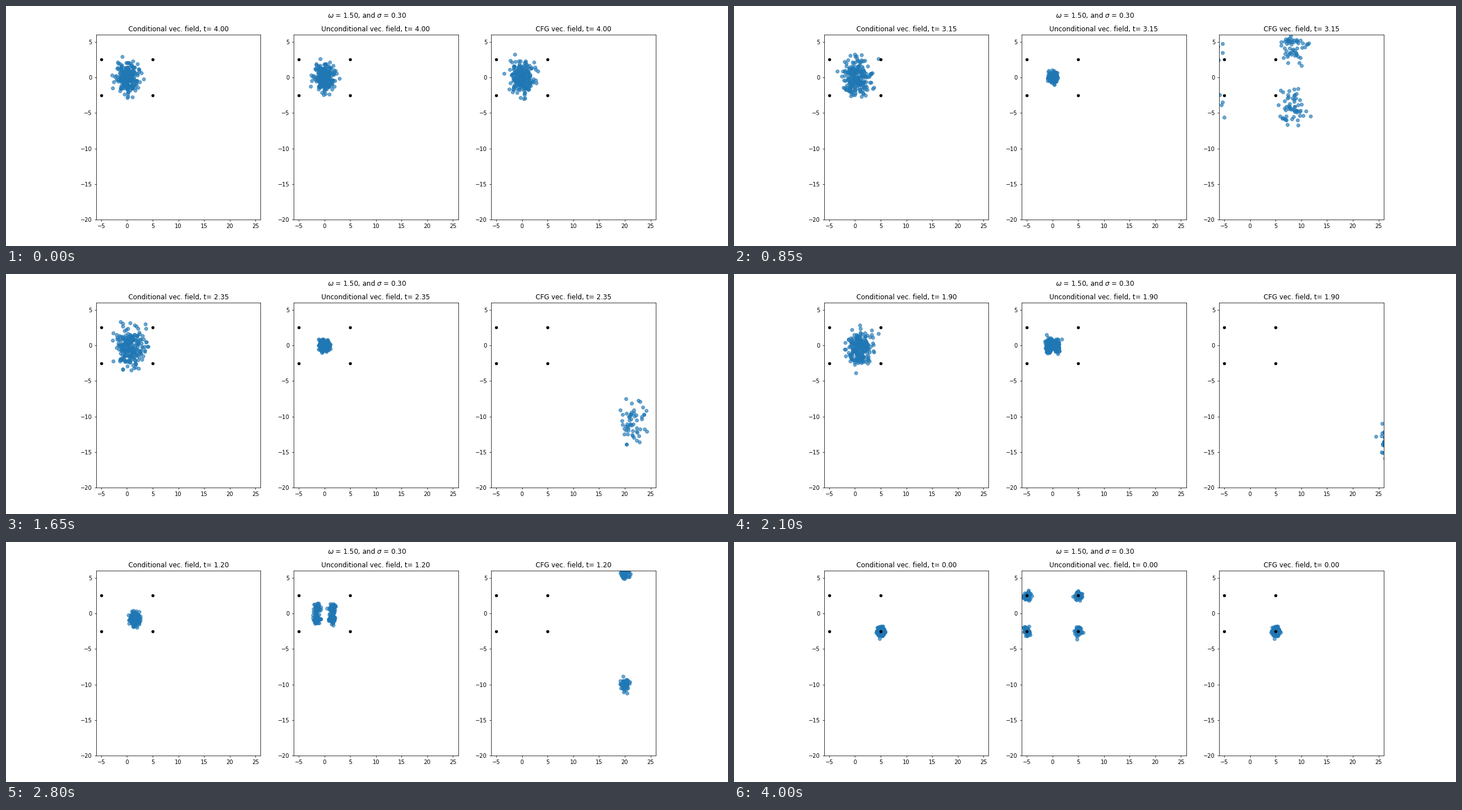
A matplotlib script that plays this animation: 1280 by 427 pixels, repeating every 4.05 s.

```python
import numpy as np
import matplotlib.pyplot as plt
from matplotlib.animation import FuncAnimation

W, H = 1280, 427
DPI = W / 18
FRAMES, DT, T0 = 81, 0.05, 4.0
N = 224
KICK = 0.28                        # noise added at every step
TARGET = np.array([5.0, -2.5])
MODES = [(x, y) for x in (-5, 5) for y in (-2.5, 2.5)]
NAMES = ["Conditional", "Unconditional", "CFG"]

times = np.round(T0 - DT * np.arange(FRAMES), 2)
elapsed = T0 - times

# Deviation of the clouds: wide until t = 1.65, then narrow; or settling fast.
spread_c = (0.32 + 1.3 / (1 + np.exp(-4 * (times - 1.65)))
            - 0.5 * np.exp(-elapsed))
spread_u = 0.33 + 0.67 * np.exp(-4 * elapsed)

# The guided cloud is split in four, thrown outward and pulled back.
centre = (1 + 0.9 * times) * np.exp(-0.63 * times ** 2)
swing = np.minimum(2.6 * times ** 1.06, 1.65 * (4.15 - times) ** 1.6)

kicks = np.random.default_rng(5).standard_normal((FRAMES, N, 2))
k = np.arange(N)
side = np.column_stack([1 - 2 * (k % 2), 1 - 2 * (k // 2 % 2)])


def wander(spread):
    """Correlated noise whose deviation follows the given curve."""
    path = [kicks[0] * spread[0]]
    for n in range(1, FRAMES):
        keep = np.sqrt(spread[n] ** 2 - KICK ** 2) / spread[n - 1]
        path.append(keep * path[-1] + KICK * kicks[n])
    return path


noise_c, noise_u = wander(spread_c), wander(spread_u)


def clouds(i):
    shrink = np.exp(-times[i])
    return (TARGET * shrink + noise_c[i],
            TARGET * side * shrink + noise_u[i],
            TARGET * (centre[i] - side * swing[i]) + noise_c[i])


fig, axes = plt.subplots(1, 3, dpi=DPI,
                         figsize=((W + 0.01) / DPI, (H + 0.01) / DPI))
fig.subplots_adjust(left=0.12475, right=0.89975)
fig.suptitle(r"$\omega$ = 1.50, and $\sigma$ = 0.30")
dots = []
for ax in axes:
    dots.append(ax.scatter(np.zeros(N), np.zeros(N), color="C0", alpha=0.65))
    ax.scatter(*zip(*MODES), color="black", s=20, zorder=3)
    ax.set_xlim(-6, 26)
    ax.set_ylim(-20, 6)


def update(i):
    for ax, dot, name, pts in zip(axes, dots, NAMES, clouds(i)):
        dot.set_offsets(pts)
        ax.set_title(f"{name} vec. field, t= {times[i]:.2f}")
    return dots


anim = FuncAnimation(fig, update, frames=FRAMES, interval=50,
                     init_func=lambda: update(0), repeat=True, repeat_delay=0)
plt.show()
```
